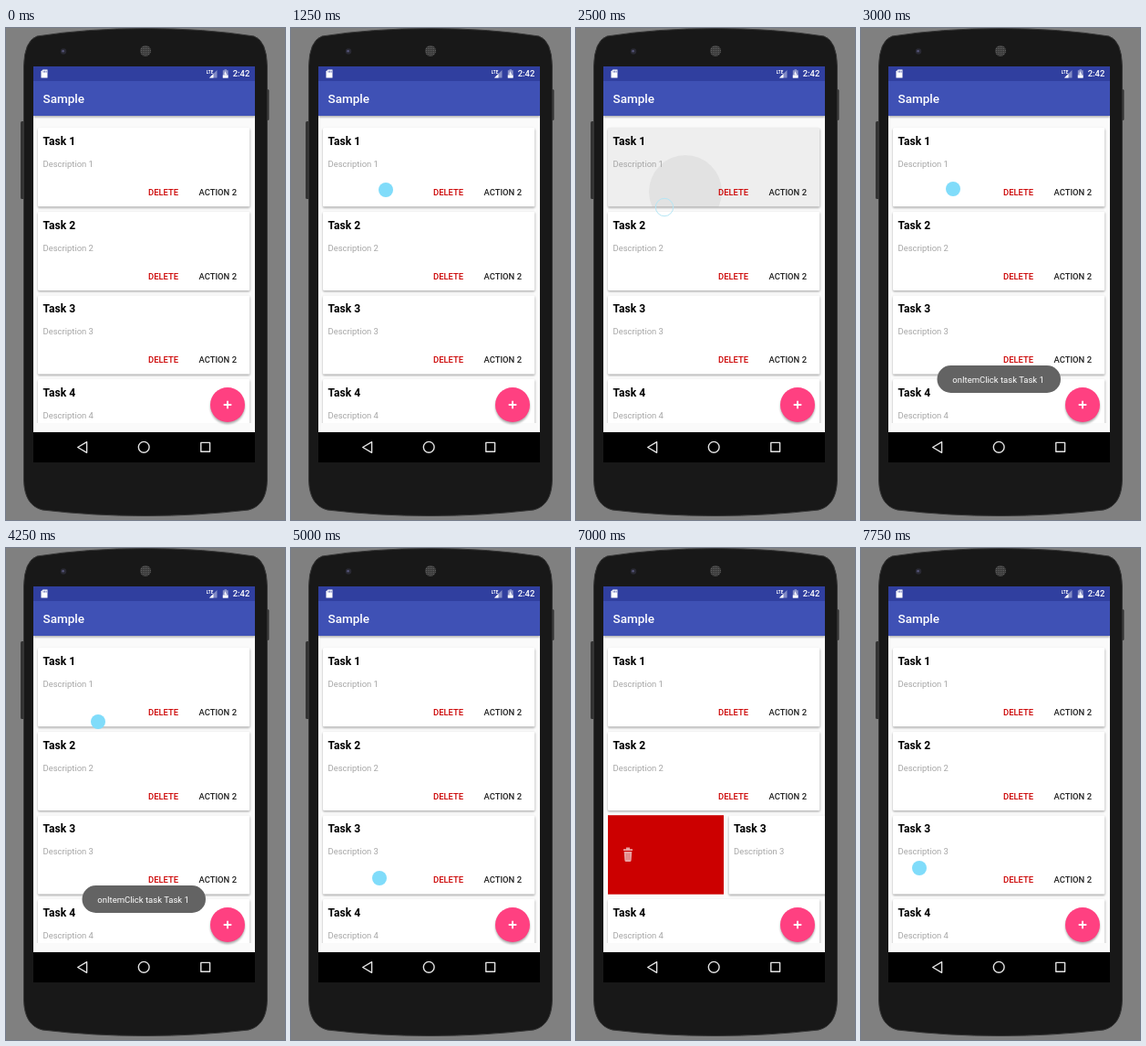
These frames come from a looping animation (306x538 px, 8000 ms). An HTML page:

```html
<!DOCTYPE html>
<html lang="en">
<head>
<meta charset="utf-8">
<title>Swipe list sample</title>
<style>
html, body { margin: 0; width: 100%; height: 100%; overflow: hidden; background: #808080; }
svg { display: block; width: 100vw; height: 100vh; }
text { font-family: Roboto, "Open Sans", sans-serif; }
.title { font-size: 12.1px; font-weight: 700; }
.desc { font-size: 9.45px; fill: #a6a6a6; }
.button { font-size: 9.45px; font-weight: 500; fill: #212121; }
.delete { fill: #cc0000; }
.nav { fill: none; stroke: #e4e4e4; stroke-width: 1.4; stroke-linejoin: round; }
</style>
</head>
<body>
<svg viewBox="0 0 306 538" preserveAspectRatio="none">
  <defs>
    <clipPath id="screen"><rect x="30" y="42" width="243" height="433"/></clipPath>
    <clipPath id="list"><rect x="30" y="96" width="243" height="336"/></clipPath>
    <clipPath id="face"><rect x="35" width="232.5" height="86.5" rx="1.5"/></clipPath>
    <pattern id="mesh" width="2" height="2" patternUnits="userSpaceOnUse">
      <rect width="2" height="2" fill="#383838"/><rect width="1" height="1" fill="#646464"/>
    </pattern>
    <filter id="soft" x="-20%" y="-20%" width="140%" height="150%"><feGaussianBlur stdDeviation="1"/></filter>
  </defs>

  <rect width="306" height="538" fill="#808080"/>
  <rect x="16" y="102" width="5" height="85" rx="1.5" fill="#333"/>
  <rect x="284" y="67" width="4.5" height="34" rx="1.5" fill="#333"/>
  <path d="M19.5 42Q20 14 34 9Q88 .5 153 .5T272 9Q286 14 286.5 42V494Q286 522 266 527Q210 533.5 153 533.5T40 527Q20 522 19.5 494Z" fill="#181818" stroke="#363636"/>
  <circle cx="63" cy="25.5" r="3.2" fill="#292933"/>
  <circle cx="62.6" cy="25.2" r="1.3" fill="#56567a"/>
  <circle cx="153" cy="25" r="6" fill="url(#mesh)"/>

  <g clip-path="url(#screen)">
    <rect x="30" y="96" width="243" height="346" fill="#fafafa"/>
    <g id="cards" clip-path="url(#list)"></g>

    <rect x="30" y="94" width="243" height="3.5" fill="#000" opacity=".3" filter="url(#soft)"/>
    <rect x="30" y="57" width="243" height="39" fill="#3f51b5"/>
    <rect x="30" y="42" width="243" height="16" fill="#303f9f"/>
    <text x="40.5" y="82" font-size="13.5" font-weight="500" fill="#fff">Sample</text>
    <path d="M40.5 45.5H45.5V54.5H38.5V47.5Z" fill="#fff"/>
    <path d="M41 46.7V48.7M42.6 46.7V48.7M44.2 46.7V48.7" stroke="#303f9f" stroke-width=".7"/>
    <path d="M231.5 46V54.5H223Z" fill="#fff" opacity=".4"/>
    <path d="M227.5 50V54.5H223Z" fill="#fff"/>
    <text x="219.8" y="49.5" font-size="4.6" font-weight="700" fill="#fff">LTE</text>
    <path d="M239.5 45.2H242V46.2H243.6V54.6H237.8V46.2H239.5Z" fill="#fff" opacity=".45"/>
    <path d="M237.8 51.5H243.6V54.6H237.8Z" fill="#fff"/>
    <path d="M241 47L239.2 50.6H240.5V53L242.3 49.7H241Z" fill="#fff"/>
    <text x="248.7" y="53.3" font-size="9.45" font-weight="500" fill="#fff">2:42</text>

    <circle cx="243" cy="414" r="19" fill="#000" opacity=".32" filter="url(#soft)"/>
    <circle cx="243" cy="412" r="19" fill="#ff4081"/>
    <path d="M238.7 412H247.3M243 407.7V416.3" stroke="#fff" stroke-width="1.9"/>

    <g id="toast">
      <rect x="83.5" y="369" width="135.5" height="30" rx="15" fill="#636363"/>
      <text x="100.3" y="387.8" font-size="9.5" fill="#fff">onItemClick task Task 1</text>
    </g>

    <rect x="30" y="442" width="243" height="33"/>
    <path class="nav" d="M78.7 458.5L88.6 452.7V464.3Z"/>
    <circle class="nav" cx="151.2" cy="458.3" r="5.9"/>
    <rect class="nav" x="213.8" y="453.4" width="9.8" height="9.8"/>
  </g>
  <circle id="pointer"/>
</svg>

<script>
const LOOP = 8000, STEP = 250;
const $ = id => document.getElementById(id);

function set(el, attrs) {
  for (const key in attrs) el.setAttribute(key, attrs[key]);
}

// Pointer stops: time, x, y, pressed; null hides it.
const stops = [
  [0, null],
  [500, 74, 62], [750, 82, 98], [1000, 96, 140], [1250, 104, 177], [1500, 98, 197],
  [1750, 97, 194], [2000, 97, 196], [2250, 97, 196, 1], [2750, 98, 197, 1],
  [3000, 101, 176], [4250, 101, 190], [4500, 100, 245], [4750, 98, 315],
  [5000, 97, 361], [5250, 95, 360], [5500, 76, 348], [5750, 56, 335],
  [6250, 62, 343, 1], [6500, 196, 355, 1], [6750, 294, 354, 1],
  [7000, null], [7250, 294, 352], [7500, 150, 351], [7750, 64, 350]
];
// Steps of other values: time, value.
const slide = [[0, 0], [6500, 129.5], [6750, 132.5], [7500, 0]];
const toastAlpha = [[0, 0], [2750, 1], [4750, .5], [5000, 0]];
// Ripples: time, centre x, centre y, radius, tint.
const ripples = [
  [[0, 0, 0, 0, 0], [2500, 120, 70, 40, .05], [2750, 151, 43, 110, .04], [3000, 0, 0, 0, 0]],
  null,
  [[0, 0, 0, 0, 0], [6250, 66, 48, 14, .04], [6500, 85.5, 41, 47, .04], [6750, 0, 0, 0, 0]]
];

const at = (list, t) => list.filter(row => row[0] <= t).pop();

function card(i) {
  const y = 109 + i * 91.6;
  const bin = i === 2 ? `
    <rect class="red" x="35" y="${y}" height="86.5" fill="#cc0000"/>
    <g class="bin" fill="#e9a2a2">
      <path d="M52 329.2H55V327.4H59V329.2H62V331H52Z"/>
      <path d="M52.7 332H61.3L60.6 341.4Q60.5 343 59 343H55Q53.5 343 53.4 341.4Z"/>
      <path d="M55.3 334V341M57 334V341M58.7 334V341" stroke="#d96b6b" stroke-width=".6"/>
    </g>` : "";
  return `${bin}<g class="card"><g transform="translate(0 ${y})">
    <rect x="35" y="1.2" width="232.5" height="86.5" rx="1.5" opacity=".32" filter="url(#soft)"/>
    <g clip-path="url(#face)">
      <rect x="35" width="232.5" height="86.5" fill="#fff"/>
      <rect class="tint" x="35" width="232.5" height="86.5" opacity="0"/>
      <circle class="ripple" r="0"/>
    </g>
    <text class="title" x="40.5" y="19">Task ${i + 1}</text>
    <text class="desc" x="40.5" y="43.2">Description ${i + 1}</text>
    <text class="button delete" x="156" y="74">DELETE</text>
    <text class="button" x="211.5" y="74">ACTION 2</text>
  </g></g>`;
}

$("cards").innerHTML = [0, 1, 2, 3].map(card).join("");
const cards = [...document.querySelectorAll(".card")];
const red = document.querySelector(".red");
const bin = document.querySelector(".bin");

function draw(time) {
  const t = Math.floor(time / STEP) * STEP;

  const [, x, y, pressed] = at(stops, t);
  set($("pointer"), x === null ? { visibility: "hidden" } : {
    visibility: "visible", cx: x, cy: y,
    r: pressed ? 9.7 : 8,
    fill: pressed ? "none" : "#80dcfa",
    stroke: pressed ? "#b5e6f5" : "none"
  });

  const shift = at(slide, t)[1];
  set(cards[2], { transform: `translate(${shift} 0)` });
  set(red, { width: Math.max(0, shift - 5.5) });
  set(bin, { visibility: shift ? "visible" : "hidden" });

  ripples.forEach((list, i) => {
    if (!list) return;
    const [, cx, cy, r, tint] = at(list, t);
    set(cards[i].querySelector(".ripple"), { cx, cy, r, opacity: tint });
    set(cards[i].querySelector(".tint"), { opacity: tint * 1.3 });
  });

  set($("toast"), { opacity: at(toastAlpha, t)[1] });
}

const start = performance.now();
function tick() {
  draw((performance.now() - start) % LOOP);
  requestAnimationFrame(tick);
}
tick();
</script>
</body>
</html>
```
